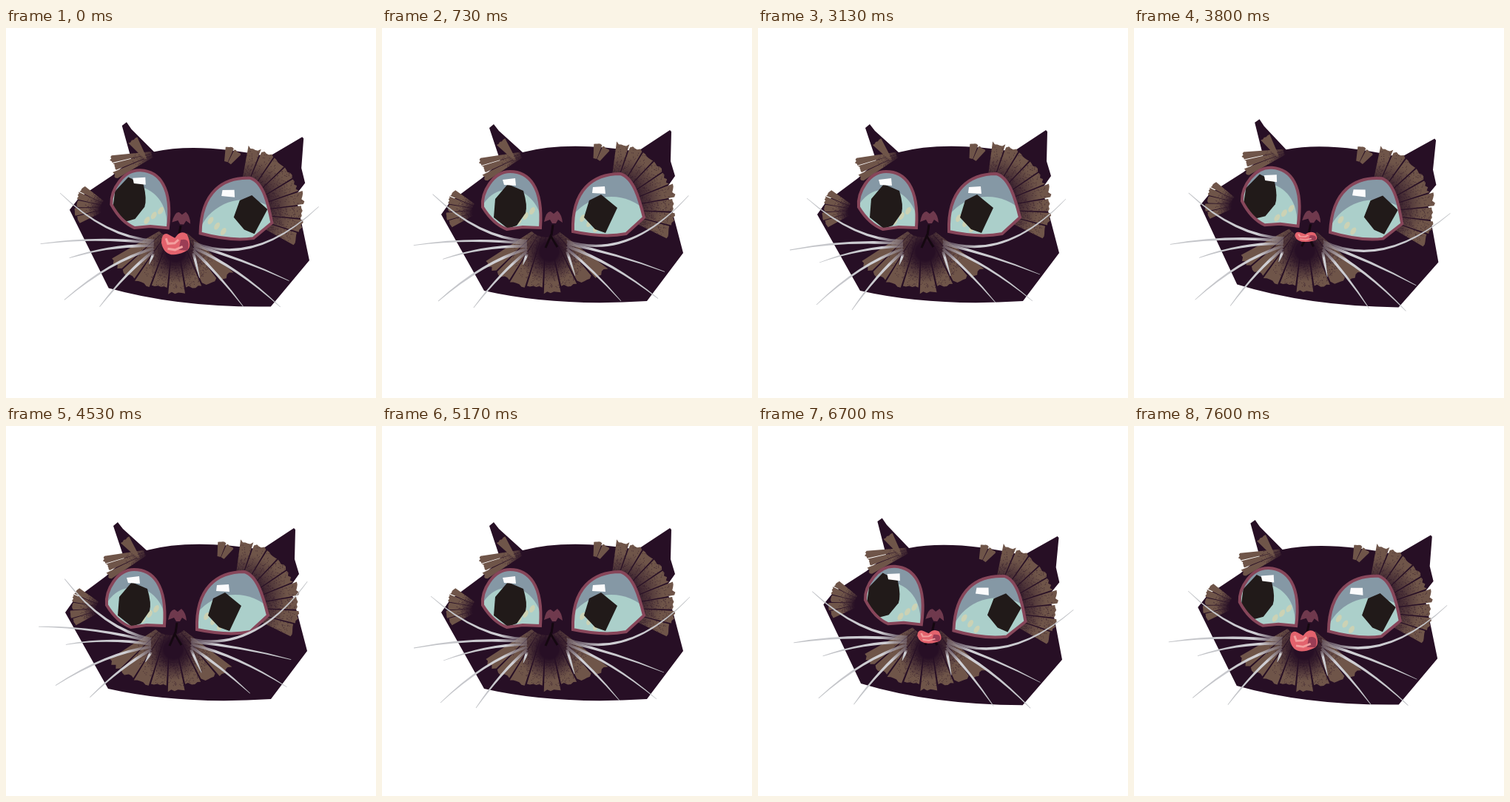
Write an HTML page with a canvas that moves like this. It is 500 by 500 pixels and loops after 7660 ms.

```html
<!DOCTYPE html>
<html lang="en">
<head>
<meta charset="utf-8">
<title>Cat</title>
<style>
html, body { margin: 0; height: 100%; overflow: hidden; background: #fff; }
canvas { display: block; width: 100vw; height: 100vh; }
</style>
</head>
<body>
<canvas id="stage" width="500" height="500"></canvas>
<script>
const ctx = document.getElementById('stage').getContext('2d');
const LOOP = 7660;
const DARK = '#270f25', BROWN = '#6f5549', PINK = '#87465a';

let seed = 7;
const rnd = () => (seed = seed * 16807 % 2147483647) / 2147483647;

const head = new Path2D(`M80 252 L92 235 L135 203 L160 180 L145 135 L151 130 L158 139 L190 168
  Q250 152 345 167 L389 138 L391 140 L390 180 L396 200 L384 217 L396 262 L407 304 L358 369
  Q235 377 138 355 Z`);

// Brush tufts fanned around (x, y) from angle a to b, darkened around shade = [x, y, r]
function fan(x, y, rx, ry, a, b, count, inner, shade) {
  const path = new Path2D(), dots = new Path2D(), slot = (b - a) / count;
  const at = (ang, r) => [x + Math.cos(ang) * rx * r, y + Math.sin(ang) * ry * r];
  for (let i = 0; i < count; i++) {
    const from = a + slot * (i + .05), to = a + slot * (i + .95), reach = 1.03 - .07 * rnd();
    path.moveTo(...at(from, inner));
    for (let k = 0; k <= 5; k++) path.lineTo(...at(from + (to - from) * k / 5, reach - .05 * rnd()));
    path.lineTo(...at(to, inner));
    path.closePath();
  }
  const [sx, sy, r] = shade;
  for (let i = 0; i < r * 28; i++) {
    const ang = rnd() * 7, d = r * (.4 + .8 * rnd() ** 1.3);
    dots.rect(sx + Math.cos(ang) * d, sy + Math.sin(ang) * d, 1, 1);
  }
  const color = ctx.createRadialGradient(sx, sy, r * .3, sx, sy, r);
  color.addColorStop(0, DARK);
  color.addColorStop(1, BROWN);
  return { path, dots, color };
}
const furs = [
  fan(205, 165, 76, 76, 2.55, 3, 3, .25, [200, 184, 32]),
  fan(185, 185, 41, 41, 3.85, 4.25, 1, .2, [186, 190, 16]),
  fan(137, 246, 50, 47, 2.6, 3.8, 5, .3, [130, 250, 26]),
  fan(285, 190, 35, 35, -1.55, -.8, 2, .4, [290, 200, 18]),
  fan(305, 245, 94, 94, -1.45, .47, 9, .4, [318, 234, 62]),
  fan(222, 262, 112, 95, .72, 2.5, 8, .22, [226, 302, 42])
];

// Eye parts: outline, iris ellipse, pupil, centre of the flecks, shine
const eyes = [
  {
    shape: new Path2D('M214 270 C218 214 198 194 173 194 C150 194 134 222 136 242 Q150 265 169 272 L190 269 Z'),
    iris: [172, 268, 44, 50],
    pupil: new Path2D('M170 211 L191 220 Q197 240 194 250 L182 267 L170 271 L151 256 L153 231 Z'),
    flecks: [194, 254, -1],
    shine: new Path2D('M163 205 L180 203 L181 213 L165 212 Z')
  },
  {
    shape: new Path2D('M258 275 C256 218 286 197 322 197 C340 202 348 232 354 256 L330 278 Q300 284 258 275 Z'),
    iris: [310, 294, 66, 66],
    pupil: new Path2D('M280 233 L296 225 L318 243 L302 277 L288 272 L273 256 Z'),
    flecks: [280, 264, 1],
    shine: new Path2D('M285 215 L301 214 L302 224 L284 223 Z')
  }
];
const nose = new Path2D('M219 262 Q222 247 228 248 L232 251 L237 247 Q243 252 244 263 L238 259 L235 264 H230 L227 259 Z');
const mouth = new Path2D('M231 266 L229 280 M221 297 L228 281 L237 296');
const tongue = new Path2D('M206 290 Q206 274 216 279 L224 283 Q231 271 240 277 Q250 296 238 301 Q212 314 206 290 Z');
const tongueSide = new Path2D('M232 285 Q246 281 242 299 H230 Z');
const tongueLight = new Path2D('M212 284 L215 291 L224 290 L229 285 M215 298 L225 299 L235 294');

// Whisker tips and how far each one sags, listed downwards on each side
const leftTips = [[66, 230, 28], [43, 300, -10], [83, 317, -10], [79, 374, -18], [127, 381, -10], [191, 320, 0]];
const rightTips = [[416, 231, 58], [381, 333, -6], [371, 369, -14], [321, 371, -6], [260, 335, 0]];

// Poses: head turn, lowering, left pupil x y, right pupil x y, tongue
const C = [0, 0, 0, 0, 0, 0, 0];
const L = [-.02, 0, -12, -7, -14, -2, 0];
const A = [.05, 2, -13, -7, 29, -5, 1];
const keys = [[-900, A], [270, C], [1440, L], [2480, C], [3280, A], [4270, C], [5440, L], [6160, C], [6480, A]];

const bump = (u, at, w) => Math.exp(-(((u - at) / w) ** 2));
const easeBack = u => 1 + 2.4 * (u - 1) ** 3 + 1.4 * (u - 1) ** 2;

function poseAt(t) {
  let i = keys.length - 1;
  while (keys[i][0] > t) i--;
  const from = keys[Math.max(0, i - 1)][1], [start, to] = keys[i];
  const e = easeBack(Math.min(1, (t - start) / 200));
  const pose = to.map((v, k) => from[k] + (v - from[k]) * e);
  const lick = Math.sin(Math.PI * t / 400) ** 2 * Math.max(0, pose[6]);
  pose[0] += .03 * lick;
  pose[1] -= 2 * lick;
  pose[6] -= .6 * lick;
  // Whiskers drop on each turn, and perk up after licking
  const u = (t - start) / 1000;
  const perk = (from === A ? bump(u, .24, .17) : 0) - 1.3 * bump(u, .08, .06) - .3 * lick;
  return { pose, perk };
}

function fill(path, color) {
  ctx.fillStyle = color;
  ctx.fill(path);
}

function line(path, color, width) {
  ctx.strokeStyle = color;
  ctx.lineWidth = width;
  ctx.stroke(path);
}

function disc(x, y, rx, ry, turn, color) {
  ctx.beginPath();
  ctx.ellipse(x, y, rx, ry, turn, 0, 7);
  ctx.fillStyle = color;
  ctx.fill();
}

function drawFur({ path, dots, color }) {
  fill(path, color);
  ctx.save();
  ctx.clip(path);
  ctx.globalAlpha = .5;
  fill(dots, DARK);
  ctx.restore();
}

function drawEye({ shape, iris: [x, y, rx, ry], pupil, flecks: [fx, fy, slope], shine }, dx, dy) {
  ctx.save();
  ctx.clip(shape);
  fill(shape, '#8598a5');
  disc(x + dx * .3, y + dy * .3, rx, ry, 0, '#abcfca');
  for (const k of [-1, 0, 1]) disc(fx + k * 9, fy + slope * k * 7, 3.2, 5.5, .5, '#ccd2b4');
  ctx.translate(dx, dy);
  fill(pupil, '#211a19');
  ctx.restore();
  line(shape, PINK, 4);
  fill(shine, '#fbfbfc');
}

function drawWhiskers(tips, x, turn) {
  tips.forEach(([tx, ty, sag], i) => {
    const y = 288 + 3.5 * i, w = 1.9;
    const len = Math.hypot(tx - x, ty - y);
    const nx = -(ty - y) / len * w, ny = (tx - x) / len * w;
    const bx = (x + tx) / 2, by = (y + ty) / 2 + sag;
    const color = ctx.createLinearGradient(x, y, tx, ty);
    color.addColorStop(0, '#85788280');
    color.addColorStop(.25, '#d0d0d5');
    color.addColorStop(1, '#bfc1c5');
    ctx.save();
    ctx.translate(x, y);
    ctx.rotate(turn);
    ctx.translate(-x, -y);
    ctx.beginPath();
    ctx.moveTo(x + nx, y + ny);
    ctx.quadraticCurveTo(bx + nx, by + ny, tx + nx * .2, ty + ny * .2);
    ctx.lineTo(tx - nx * .2, ty - ny * .2);
    ctx.quadraticCurveTo(bx - nx, by - ny, x - nx, y - ny);
    ctx.fillStyle = color;
    ctx.fill();
    ctx.restore();
  });
}

function drawMouth(out) {
  line(mouth, '#140810', 3);
  if (out < .03) return;
  ctx.save();
  ctx.translate(228, 278);
  ctx.scale(.6 + .4 * out, out);
  ctx.translate(-228, -278);
  fill(tongue, '#e3636d');
  fill(tongueSide, '#9b3d55');
  line(tongueLight, '#f3a09f', 3);
  ctx.restore();
}

function draw(t) {
  const { pose: [turn, drop, lx, ly, rx, ry, out], perk } = poseAt(t);
  ctx.clearRect(0, 0, 500, 500);
  ctx.save();
  ctx.translate(250, 367 + drop);
  ctx.rotate(turn);
  ctx.translate(-250, -367);
  fill(head, DARK);
  furs.forEach(drawFur);
  drawEye(eyes[0], lx, ly);
  drawEye(eyes[1], rx, ry);
  fill(nose, '#6f394d');
  drawMouth(out);
  drawWhiskers(leftTips, 196, .19 * perk);
  drawWhiskers(rightTips, 250, -.13 * perk);
  ctx.restore();
}

// Drawings change every 40 ms or so, with a short hold at each 800 ms mark
function frame(now) {
  const t = now % LOOP, m = t % 800;
  const step = m < 70 ? 0 : 1 + Math.floor((m - 70) / 38.4);
  draw((Math.floor(t / 800) * 20 + step) * 40);
  requestAnimationFrame(frame);
}
requestAnimationFrame(frame);
</script>
</body>
</html>
```
